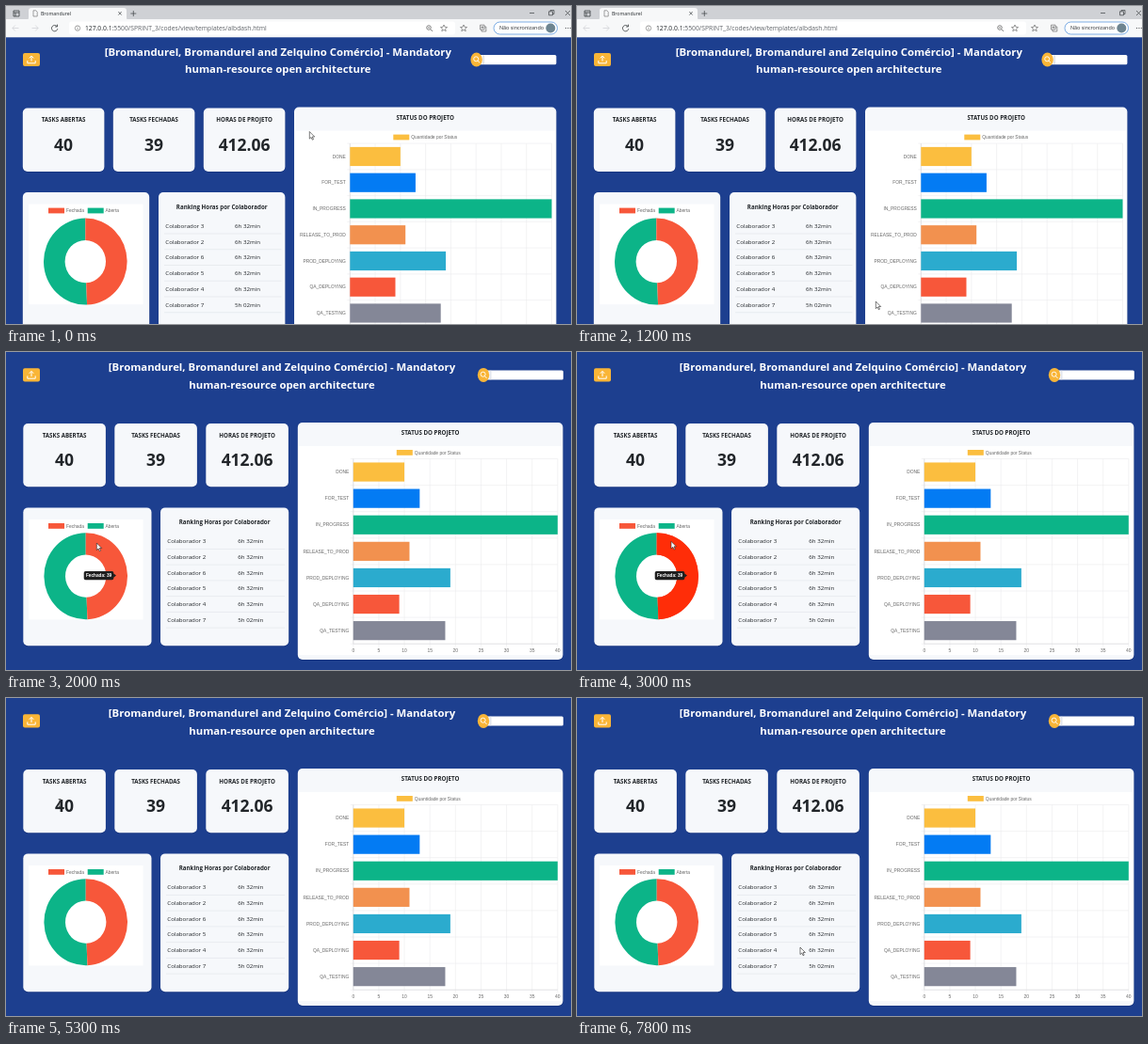
These frames come from a looping animation (600x338 px, 8000 ms). An HTML page:

```html
<!DOCTYPE html>
<html lang="pt">
<head>
<meta charset="utf-8">
<title>Dashboard</title>
<style>
html, body { margin: 0; width: 100%; height: 100%; overflow: hidden; background: #1d3f8f; }
svg { display: block; width: 100vw; height: 100vh; }
text { font-family: "Open Sans", "Noto Sans", sans-serif; fill: #212529; white-space: pre; }
.chart { font-family: "Liberation Sans", sans-serif; font-size: 4.9px; fill: #666; }
.bold { font-weight: 700; }
</style>
</head>
<body>
<svg id="stage" viewBox="0 0 600 338" preserveAspectRatio="none" xmlns="http://www.w3.org/2000/svg"></svg>
<script>
const LOOP = 8000, CUT = 1300;
const stage = document.getElementById('stage');
const RED = '#f7573a', GREEN = '#0cb488', YELLOW = '#fbbe3f';

function add(parent, tag, attrs, content) {
  const el = document.createElementNS('http://www.w3.org/2000/svg', tag);
  for (const key in attrs) el.setAttribute(key, attrs[key]);
  if (content !== undefined) el.textContent = content;
  parent.appendChild(el);
  return el;
}
const rect = (p, x, y, width, height, fill, rx = 0) => add(p, 'rect', { x, y, width, height, fill, rx });
const path = (p, d, stroke, width = 0.8, fill = 'none') =>
  add(p, 'path', { d, stroke, 'stroke-width': width, fill });
const label = (p, x, y, text, size, extra = {}) =>
  add(p, 'text', { x, y, 'font-size': size, ...extra }, text);
const heading = (p, x, y, text, size = 6.2, extra = {}) =>
  label(p, x, y, text, size, { class: 'bold', 'text-anchor': 'middle', ...extra });
const chartText = (p, x, y, text, anchor = 'start') =>
  add(p, 'text', { x, y, class: 'chart', 'text-anchor': anchor }, text);

function card(p, x, y, w, h) {
  add(p, 'rect', { x: x - 0.3, y: y + 0.6, width: w + 0.6, height: h + 0.4, rx: 5.3, fill: '#0b1d4d', opacity: 0.2 });
  rect(p, x, y, w, h, '#f6f8fb', 5);
}

// Ring segment between two fractions of a turn, clockwise from the top
function ring(p, cx, cy, from, to, fill) {
  const at = (f, rx, ry) => {
    const a = f * 2 * Math.PI;
    return `${cx + rx * Math.sin(a)} ${cy - ry * Math.cos(a)}`;
  };
  const big = to - from > 0.5 ? 1 : 0;
  const d = `M${at(from, 44.3, 46)}A44.3 46 0 ${big} 1 ${at(to, 44.3, 46)}` +
    `L${at(to, 21.7, 22.6)}A21.7 22.6 0 ${big} 0 ${at(from, 21.7, 22.6)}Z`;
  return path(p, d, 'none', 0, fill);
}

const BARS = [
  ['DONE', 10, YELLOW], ['FOR_TEST', 13, '#037bf3'], ['IN_PROGRESS', 40, GREEN],
  ['RELEASE_TO_PROD', 11, '#f2914f'], ['PROD_DEPLOYING', 19, '#2babce'],
  ['QA_DEPLOYING', 9, RED], ['QA_TESTING', 18, '#848797']
];
const RANKING = [[3, '6h 32min'], [2, '6h 32min'], [6, '6h 32min'], [5, '6h 32min'], [4, '6h 32min'], [7, '5h 02min']];
const TOTALS = [['TASKS ABERTAS', '40'], ['TASKS FECHADAS', '39'], ['HORAS DE PROJETO', '412.06']];

function statusChart(g, o) {
  const { chartX: x, chartW: w, x0, unit, step } = o;
  const top = 113.5, bottom = top + 7 * step, right = x0 + 40 * unit;
  card(g, x, 75, w, 252);
  heading(g, x + w / 2, 88.3, 'STATUS DO PROJETO');
  rect(g, x + 1, 100, w - 2, 222, '#fff');
  rect(g, x0 + 46, 104, 17, 5.8, YELLOW);
  chartText(g, x0 + 65, 108.6, 'Quantidade por Status');
  let grid = '';
  for (let i = 0; i <= 8; i++) {
    const gx = x0 + i * 5 * unit;
    grid += `M${gx} ${top}V${bottom + 3}`;
    chartText(g, gx, 318.6, i * 5, 'middle');
  }
  for (let i = 0; i <= 7; i++) grid += `M${x0 - 3} ${top + i * step}H${right}`;
  path(g, grid, '#e6e6e8', 0.5);
  path(g, `M${x0} ${top}V${bottom}H${right}`, '#cfcfd3', 0.5);
  BARS.forEach(([name, value, color], i) => {
    const mid = top + (i + 0.5) * step;
    chartText(g, x0 - 4.5, mid + 1.7, name, 'end');
    rect(g, x0, mid - 10.1, value * unit, 20.2, color);
  });
}

function dashboard(o) {
  const g = add(stage, 'g', { transform: `translate(0 ${o.dy})` });
  const title = { style: 'fill:#fff' };
  heading(g, o.titleX, 20.3, '[Bromandurel, Bromandurel and Zelquino Comércio] - Mandatory', 11.35, title);
  heading(g, o.titleX, 38.6, 'human-resource open architecture', 11.35, title);

  rect(g, 18, 17.3, 18, 14.2, '#f9b537', 2);
  path(g, 'M27 26V20.6M24.7 22.8L27 20.4L29.3 22.8M22.8 25.4V28.2H31.2V25.4', '#fff', 1);

  rect(g, o.searchX, 19.4, 84.8, 10.2, '#fff', 1.5);
  rect(g, o.searchX + 6.5, 19.8, 2, 9.4, '#e3e6ec');
  add(g, 'ellipse', { cx: o.searchX, cy: 24.4, rx: 6.2, ry: 7.5, fill: '#f9b537' });
  add(g, 'circle', { cx: o.searchX - 0.4, cy: 23.7, r: 2.5, fill: 'none', stroke: '#fff', 'stroke-width': 0.9 });
  path(g, `M${o.searchX + 1.4} 25.6l2 2.2`, '#fff', 1);

  TOTALS.forEach(([name, value], i) => {
    const x = o.left + i * o.pitch;
    card(g, x, 76, o.cardW, 67.3);
    heading(g, x + o.cardW / 2, 90.6, name);
    heading(g, x + o.cardW / 2, 121.4, value, 17.5);
  });

  card(g, o.left, 165.4, o.wideW, 146.8);
  rect(g, 24, 178, 121.5, 106.5, '#fff');
  rect(g, 45, 182, 17, 5.8, RED);
  chartText(g, 64, 186.6, 'Fechada');
  rect(g, 86.7, 182, 17, 5.8, GREEN);
  chartText(g, 105.6, 186.6, 'Aberta');
  const share = 39 / 79;
  ring(g, o.ringX, o.ringY, share, 1, GREEN);
  ring(g, o.ringX, o.ringY, 0, share, RED);
  const hot = ring(g, o.ringX, o.ringY, 0, share, '#ff2d08');

  card(g, o.rankX, 165.4, o.wideW, 146.8);
  heading(g, o.rankX + o.wideW / 2, 183.2, 'Ranking Horas por Colaborador');
  RANKING.forEach(([id, hours], i) => {
    const y = 203.2 + i * 16.75;
    label(g, o.rankX + 7.3, y, 'Colaborador ' + id, 6.15);
    label(g, o.hoursX, y, hours, 6.15);
    path(g, `M${o.rankX + 6} ${y + 6.2}H${o.rankX + o.wideW - 4}`, '#dfe2e7', 0.6);
  });

  statusChart(g, o);

  const tip = add(g, 'g', {});
  path(tip, 'M84.5 233H112.5Q114.3 233 114.3 234.8V235.4L117 237.6L114.3 239.8V240.4Q114.3 242.2 112.5 242.2H84.5Q82.7 242.2 82.7 240.4V234.8Q82.7 233 84.5 233Z', 'none', 0, '#1f1f1f');
  add(tip, 'text', { x: 85, y: 239.3, class: 'chart', style: 'fill:#fff;font-weight:700;font-size:4.7px' }, 'Fechada: 39');
  return { g, hot, tip };
}

function browserBar(g) {
  rect(g, 0, 0, 600, 15, '#cfd1d5');
  path(g, 'M22 15Q24 15 24 12V5Q24 2 27 2H125Q128 2 128 5V12Q128 15 130 15Z', 'none', 0, '#f7f8f9');
  rect(g, 0, 14, 600, 19.3, '#f7f8f9');
  const ink = '#3c4043', faint = '#d3d5d8';
  path(g, 'M8 5H14V11H8ZM8 7H14M10 7V11', ink, 0.8);
  path(g, 'M29 4.8H31.8L33.2 6.3V11H29Z', '#666', 0.6);
  label(g, 37, 10, 'Bromandurel', 5.2);
  path(g, 'M119.3 6L122.7 9.6M122.7 6L119.3 9.6M132.3 8H138.3M135.3 5V11', ink, 0.7);
  path(g, 'M556 7.5H561M576.5 5.8H580.5V9.8H576.5ZM578 5.8V4.5H582V8.5H580.5M594 5L599 10M599 5L594 10', ink, 0.7);

  path(g, 'M13.5 23.5H7M9.8 20.5L6.8 23.5L9.8 26.5M27.5 23.5H34M31.2 20.5L34.2 23.5L31.2 26.5', faint, 0.8);
  path(g, 'M54.1 21.6A3.2 3.2 0 1 0 54.8 24.2M54.5 19.6V22H52.1', ink, 0.8);
  rect(g, 67, 16.5, 410, 14, '#fff', 3);
  add(g, 'circle', { cx: 76, cy: 23.6, r: 2.7, fill: 'none', stroke: '#666', 'stroke-width': 0.6 });
  path(g, 'M76 23.1V25.2M76 21.7V22.4', '#666', 0.6);
  const url = label(g, 84, 26.2, '127.0.0.1', 6.75);
  add(url, 'tspan', { fill: '#5f6368' }, ':5500/SPRINT_3/codes/view/templates/albdash.html');
  add(g, 'circle', { cx: 449, cy: 23, r: 2.3, fill: 'none', stroke: '#555', 'stroke-width': 0.7 });
  path(g, 'M450.8 24.8L453 27M447.9 23H450.1', '#555', 0.7);
  const star = x => path(g, `M${x} 20l1 2.3 2.5.2-1.9 1.7.6 2.5-2.2-1.3-2.2 1.3.6-2.5-1.9-1.7 2.5-.2Z`, '#555', 0.6);
  star(465);
  star(486);
  path(g, 'M503.5 20.2H508V25H503.5ZM505 25V27H509.8V22H508M505.8 21.3V24M504.4 22.6H507.2', '#555', 0.6);
  add(g, 'rect', { x: 518, y: 17, width: 67.5, height: 13, rx: 6.5, fill: '#fff', stroke: '#4b8fdc', 'stroke-width': 0.7 });
  label(g, 524, 25.4, 'Não sincronizando', 5.4);
  add(g, 'circle', { cx: 578.3, cy: 23.5, r: 5, fill: '#6d8490' });
  for (let i = 0; i < 3; i++) add(g, 'circle', { cx: 594.5 + i * 2.4, cy: 23.5, r: 0.6, fill: ink });
}

rect(stage, 0, 0, 600, 338, '#1d3f8f');
const windowed = dashboard({
  dy: 32.6, titleX: 288.8, searchX: 499.6, left: 17.8, pitch: 96, cardW: 86.6, wideW: 134.4,
  ringX: 84.3, ringY: 239, rankX: 162, hoursX: 243, chartX: 306, chartW: 278.4, x0: 365.3, unit: 5.355, step: 27.75
});
browserBar(add(windowed.g, 'g', { transform: 'translate(0 -32.6)' }));
const full = dashboard({
  dy: 0, titleX: 293, searchX: 507, left: 18.3, pitch: 97, cardW: 87.6, wideW: 136.2,
  ringX: 84.7, ringY: 238.2, rankX: 164, hoursX: 246.3, chartX: 309.8, chartW: 281.6, x0: 368.8, unit: 5.425, step: 28.1
});

const pointer = add(stage, 'g', {});
const arrow = path(pointer, 'M0 0V7.6L1.8 6L3 8.7L4.2 8.2L3 5.5H5.4Z', '#222', 0.6, '#fff');
const beam = path(pointer, 'M-1.4 -4H1.4M0 -4V4M-1.4 4H1.4', '#333', 0.7);

// time, x, y
const ROUTE = [
  [0, 322.3, 133.5], [100, 322.3, 133.5], [500, 352, 220], [900, 366, 292], [1200, 317.3, 314],
  [1299, 317.3, 314], [1300, 96.3, 203], [2300, 96.3, 203], [2700, 100, 201.3], [3900, 100, 201.3],
  [4300, 138, 172], [4700, 79, 126], [4900, 79, 126], [5300, 57, 111.5], [5500, 57, 111.5],
  [6000, 152, 98], [6100, 152, 98], [6600, 237, 95.6], [6800, 237, 95.6],
  [7050, 283, 140], [7300, 246, 185.5], [7400, 246, 185.5], [7800, 237, 265], [8000, 237, 265]
];

const clamp = v => Math.max(0, Math.min(1, v));
const ramp = (t, from, to) => clamp((t - from) / (to - from));

function position(t) {
  let i = 1;
  while (i < ROUTE.length - 1 && t >= ROUTE[i][0]) i++;
  const [t0, x0, y0] = ROUTE[i - 1], [t1, x1, y1] = ROUTE[i];
  const k = ramp(t, t0, t1);
  return [x0 + (x1 - x0) * k, y0 + (y1 - y0) * k];
}

windowed.hot.style.display = windowed.tip.style.display = 'none';

function draw(now) {
  const t = now % LOOP;
  const isFull = t >= CUT;
  full.g.style.display = isFull ? '' : 'none';
  windowed.g.style.display = isFull ? 'none' : '';

  const leave = 1 - ramp(t, 4200, 4600);
  full.hot.setAttribute('opacity', ramp(t, 2350, 2700) * leave);
  full.tip.setAttribute('opacity', leave);

  const [x, y] = position(t);
  const onText = isFull && y > 104 && y < 125 && ((x > 51 && x < 73) || (x > 228 && x < 285));
  pointer.setAttribute('transform', `translate(${x} ${y})`);
  arrow.style.display = onText ? 'none' : '';
  beam.style.display = onText ? '' : 'none';
}

const start = performance.now();
function tick() {
  draw(performance.now() - start);
  requestAnimationFrame(tick);
}
tick();
</script>
</body>
</html>
```
